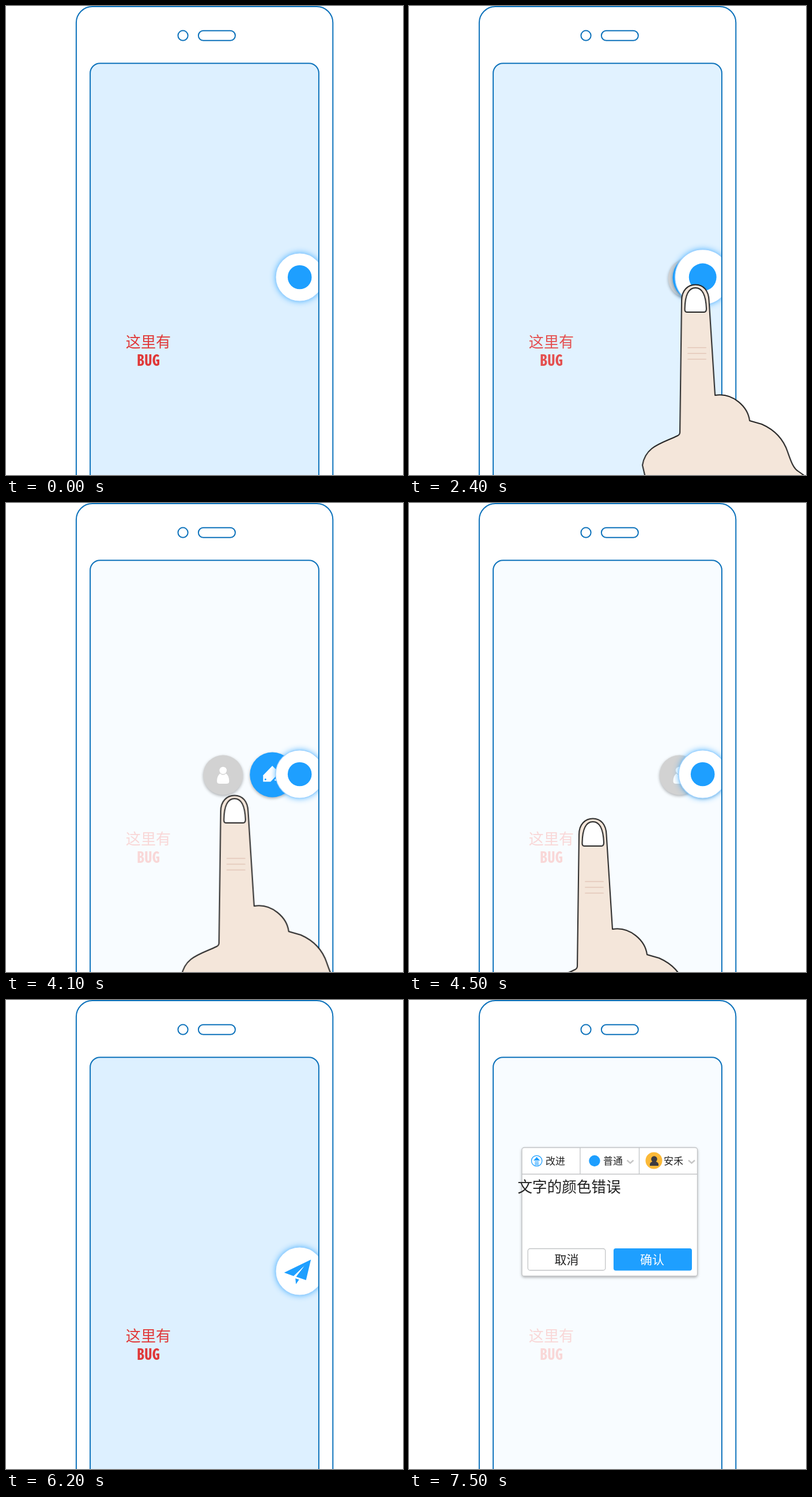
An HTML page with a canvas that plays this animation: 689 by 812 pixels, repeating every 8000 ms.

```html
<!DOCTYPE html>
<html lang="zh-CN">
<head>
<meta charset="utf-8">
<title>Report</title>
<style>
html, body { margin: 0; width: 100%; height: 100%; overflow: hidden; background: #fff; }
canvas { display: block; }
</style>
</head>
<body>
<canvas id="stage" width="689" height="812"></canvas>
<script>
const LOOP = 8000;
const BLUE = '#1e9fff', LINE = '#0d72bb', INK = '#222';
const SANS = '"Noto Sans CJK SC", "Noto Sans CJK", sans-serif';
const MONO = '"Noto Sans Mono CJK SC", "Noto Sans Mono", monospace';
const ctx = document.getElementById('stage').getContext('2d');

// Progress of a move made of n steps, 100 ms each.
const steps = (t, start, n) => Math.min(1, Math.max(0, (t - start + 100) / (n * 100)));
const mix = (a, b, p) => a + (b - a) * p;

function paint(c, fill, stroke, width) {
  if (fill) { c.fillStyle = fill; c.fill(); }
  if (stroke) { c.strokeStyle = stroke; c.lineWidth = width; c.stroke(); }
}
function disc(x, y, r, fill, stroke, width) {
  ctx.beginPath();
  ctx.arc(x, y, r, 0, Math.PI * 2);
  paint(ctx, fill, stroke, width);
}
function box(x, y, w, h, r, fill, stroke, width) {
  ctx.beginPath();
  ctx.roundRect(x, y, w, h, r);
  paint(ctx, fill, stroke, width);
}
function shape(d, fill, stroke, width, c = ctx) {
  const path = new Path2D(d);
  if (fill) { c.fillStyle = fill; c.fill(path); }
  if (stroke) { c.strokeStyle = stroke; c.lineWidth = width; c.stroke(path); }
}
function label(str, x, y, size, color, align = 'left', weight = 400, family = SANS) {
  ctx.font = `${weight} ${size}px ${family}`;
  ctx.textAlign = align;
  ctx.fillStyle = color;
  ctx.fillText(str, x, y + size * 0.38);
}
function shadow(color, blur, dy, draw) {
  ctx.save();
  ctx.shadowColor = color;
  ctx.shadowBlur = blur;
  ctx.shadowOffsetY = dy;
  draw();
  ctx.restore();
}

// The hand is drawn once so that it can fade as a whole.
const handLayer = document.createElement('canvas');
handLayer.width = 740;
handLayer.height = 840;
{
  const c = handLayer.getContext('2d');
  c.lineJoin = c.lineCap = 'round';
  shape('M424 842L422 812L418 795C423 762 452 757 479 744Q483 742 483 738L486 510' +
    'C486 492 497 482.5 510 482.5C524 482.5 533 493 533.5 510L544 674' +
    'C575 669 601 694 604 718L625 724C650 735 663 751 670 772C676 789 680 801 689 806L740 842Z',
    '#f4e6da', INK, 2, c);
  shape('M495 530Q491 530 491.5 524C492 500 498 488 510 488C522 488 528 500 529 524' +
    'Q529 530 525 530Z', '#fff', INK, 2, c);
  shape('M497 591.5H528M497 601.5H528M497 611.5H528', null, '#e3c5b7', 1.7, c);
}
function hand(x, y, alpha) {
  if (alpha <= 0) return;
  ctx.globalAlpha = alpha;
  ctx.drawImage(handLayer, x - 510, y - 482);
  ctx.globalAlpha = 1;
}

function menu(greyX, blueX) {
  const dim = 'rgba(0,0,0,0.3)';
  shadow(dim, 5, 2, () => disc(greyX, 471, 34.5, '#d2d2d2'));
  ctx.save();
  ctx.translate(greyX, 471);
  disc(0, -8, 6.3, '#fff');
  shape('M-5 -2.5Q0 2 5 -2.5C9 0 11 6 10.5 12Q10 15 6 15H-6Q-10 15 -10.5 12C-11 6 -9 0 -5 -2.5Z', '#fff');
  ctx.restore();

  shadow(dim, 5, 2, () => disc(blueX, 470.5, 39, BLUE));
  ctx.save();
  ctx.translate(blueX, 470.5);
  shape('M-16 12V1L0 -15.5L12 -3.5L-3 12Z', '#fff');
  disc(-12, 8, 1.5, BLUE);
  shape('M3 9H17M10 2V16', null, BLUE, 7);
  shape('M4 9H16M10 3V15', null, '#fff', 2.8);
  ctx.restore();
}

function floatButton(scale, plane) {
  ctx.save();
  ctx.translate(509.7, 469.5);
  ctx.scale(scale, scale);
  shadow('rgba(30,159,255,0.85)', 11, 0, () => disc(0, 0, 41.5, '#fff'));
  disc(0, 0, 41.7, '#fff', '#9ed2ff', 1.2);
  if (plane) {
    shape('M-27 2.5L19.5 -20L-10.5 8.5ZM-6.5 9.5L8 -9L19.5 -20L11 15.5Z', BLUE);
    shape('M-7.5 12.5L-1 14.5L-6.5 22.5Z', BLUE);
    shape('M-11 9L7 -8L-6.5 10Z', '#fff');
  } else {
    disc(0, 0, 20.8, BLUE);
  }
  ctx.restore();
}

function chevron(x) {
  shape(`M${x - 5.5} 277.5L${x} 282.5L${x + 5.5} 277.5`, null, '#c6c6c6', 2.4);
}
function dialog(t) {
  const edge = '#c2c4c6';
  shadow('rgba(0,0,0,0.35)', 5, 2, () => box(196, 255.5, 304.5, 222.5, 4, '#fff'));
  box(196, 255.5, 304.5, 222.5, 4, '#fff', edge, 1.3);
  shape('M196 301.5H500M297 256V301M399.5 256V301', null, edge, 1.3);

  disc(221.7, 278.5, 9.2, '#fff', BLUE, 1.3);
  shape('M221.7 271.8L227.3 278H216.1Z', BLUE);
  shape('M218.2 280.2H225.2M218.2 282.7H225.2M218.2 285.2H225.2', null, BLUE, 1.3);
  label('改进', 237, 278.5, 17, INK);

  disc(322, 278.5, 9.7, BLUE);
  label('普通', 337, 278.5, 17, INK);
  chevron(384);

  disc(425, 278, 14.5, '#fbb938');
  disc(425.5, 275.5, 5.2, '#3d3b40');
  shape('M418 287V284Q419 279.5 425.5 279.5Q432 279.5 433 284V287Z', '#3d3b40');
  label('安禾', 442, 278.5, 17, INK);
  chevron(490.5);

  box(206.3, 430.5, 134.5, 37.5, 4, '#fff', edge, 1.3);
  label('取消', 273.5, 449.5, 21, INK, 'center');
  box(355, 430, 136, 38.5, 4, BLUE);
  label('确认', 422, 449.5, 21, '#fff', 'center');

  const p = steps(t, 7400, 2);
  ctx.globalAlpha = p;
  label('文字的颜色错误', mix(253, 188.5, p), 323, 25.6, INK);
  ctx.globalAlpha = 1;
}

function draw(t) {
  const enter = steps(t, 1000, 5), open = steps(t, 2400, 7);
  const drag = steps(t, 4000, 9), leave = steps(t, 5900, 4);
  const asking = t >= 6400;

  ctx.fillStyle = '#fff';
  ctx.fillRect(0, 0, 689, 812);
  box(121.9, 1, 445.4, 900, 28, '#fff', LINE, 2);
  disc(307.1, 51.2, 8.6, '#fff', LINE, 2);
  box(333.9, 42.7, 64, 17, 8.5, '#fff', LINE, 2);

  ctx.save();
  ctx.beginPath();
  ctx.roundRect(146.1, 99.2, 396.8, 800, 17);
  ctx.clip();
  ctx.fillStyle = '#ddf0ff';
  ctx.fillRect(140, 90, 410, 730);
  label('这里有', 247, 581.5, 26.2, '#e03838', 'center', 500);
  label('BUG', 247, 613, 26.6, '#e03838', 'center', 700, MONO);

  const veil = asking ? 1 : open * (1 - steps(t, 4600, 3));
  ctx.fillStyle = `rgba(255,255,255,${0.8 * veil})`;
  ctx.fillRect(140, 90, 410, 730);

  if (asking) {
    dialog(t);
  } else {
    const back = 208 * drag;
    if (open > 0 && back < 180) {
      menu(Math.min(510, mix(510, 330.5, open) + back),
           Math.min(510, mix(510, 416, open) + back));
    }
    floatButton(1 + 0.21 * enter * (1 - Math.min(1, open * 2)), t >= 4700);
  }
  if (t >= 4900 && leave < 1) {
    disc(247.5, 598, 33 + 40 * leave, `rgba(202,48,42,${0.7 * (1 - leave)})`);
  }
  ctx.restore();
  box(146.1, 99.2, 396.8, 800, 17, null, LINE, 2);

  const x = mix(mix(510, 420, open), 247, drag ** 1.33);
  const y = mix(482, 574, drag ** 0.9);
  hand(x, y, enter * (1 - leave));
}

const begin = performance.now();
function tick() {
  const t = (performance.now() - begin) % LOOP;
  draw(Math.floor(t / 100) * 100);
  requestAnimationFrame(tick);
}
tick();
</script>
</body>
</html>
```
